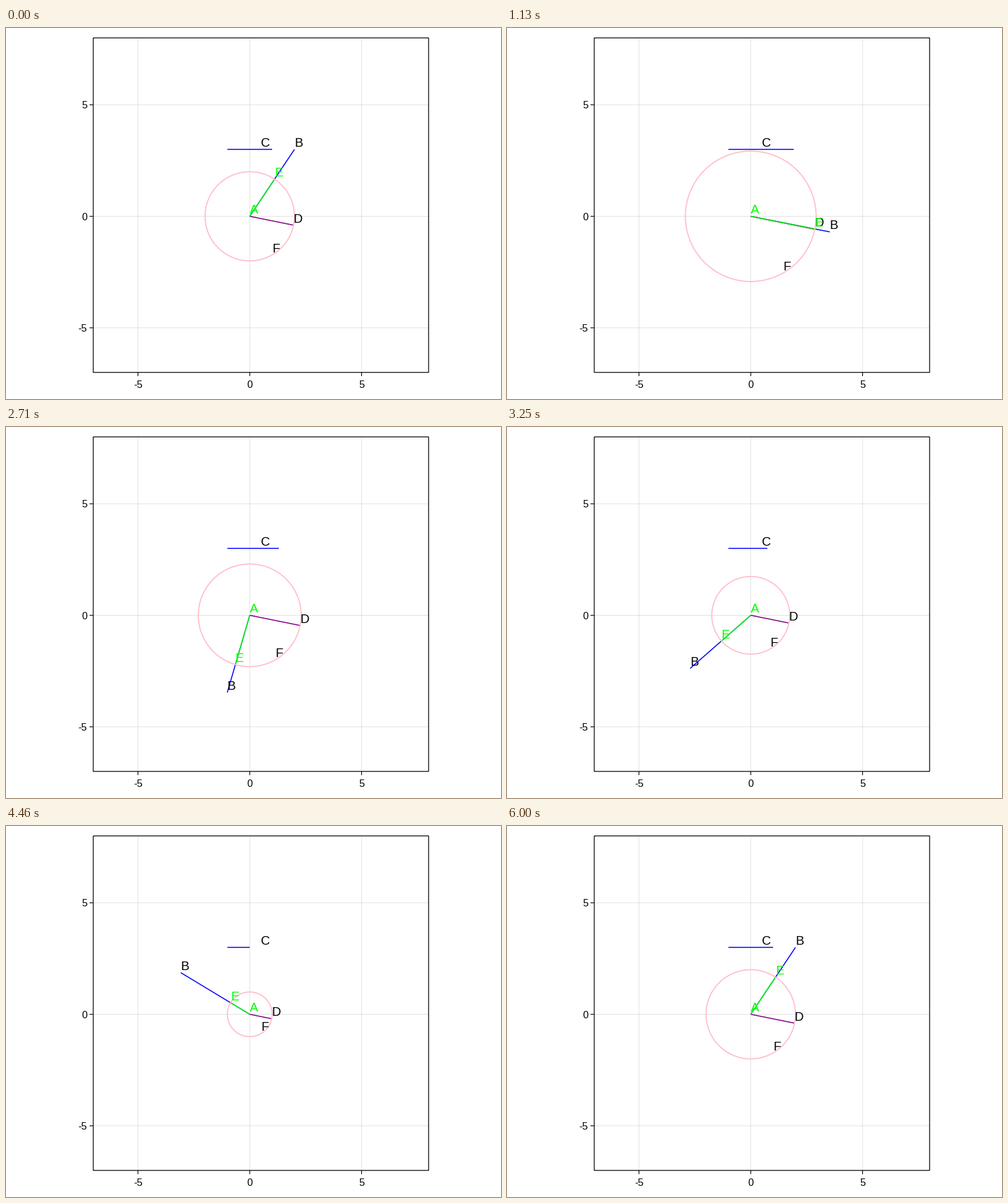
A matplotlib script for the animation above (6.04 s loop, 800 by 600 pixels).

```python
import numpy as np
import matplotlib.pyplot as plt
from matplotlib.animation import FuncAnimation

W, H, DPI = 800, 600, 100
LOOP, TICK = 6040, 20          # ms
FPS, STEPS = 24, 144           # pose rate and poses per turn
LEFT, RIGHT, TOP, BOTTOM = 141, 683, 16, 557
START = np.arctan2(3, 2)
ARM = np.hypot(2, 3)

plt.rcParams["font.family"] = "Liberation Sans"


def pt(px):
    return px * 72 / DPI


def to_px(x, y):
    """Data coordinates to stage pixels."""
    return (LEFT + (x + 7) * (RIGHT - LEFT) / 15,
            TOP + (8 - y) * (BOTTOM - TOP) / 15)


def polar(r, a):
    return r * np.cos(a), r * np.sin(a)


fig = plt.figure(figsize=(W / DPI, H / DPI), dpi=DPI, facecolor="white")
ax = fig.add_axes([0, 0, 1, 1])
ax.set_xlim(0, W)
ax.set_ylim(H, 0)
ax.axis("off")


def line(xs=(), ys=(), color="black", width=1.0, z=2, **kw):
    return ax.plot(xs, ys, color=color, lw=pt(width), zorder=z, snap=False,
                   solid_capstyle="butt", **kw)[0]


def label(s, x, y, size=20.4, color="black", ha="left"):
    return ax.text(x, y, s, fontsize=pt(size), color=color, ha=ha,
                   va="baseline", zorder=5)


# Grid, ticks and frame
for v in (-5, 0, 5):
    gx, gy = to_px(v, v)
    line([gx, gx], [TOP, BOTTOM], width=1, z=1, alpha=0.12)
    line([LEFT, RIGHT], [gy, gy], width=1, z=1, alpha=0.12)
    line([gx, gx], [BOTTOM, BOTTOM + 6], width=1.2)
    line([LEFT - 6, LEFT], [gy, gy], width=1.2)
    label(str(v), gx, 581.5, 16.2, ha="center")
    label(str(v), 131, gy + 6, 16.2, ha="right")
line([LEFT, RIGHT, RIGHT, LEFT, LEFT], [TOP, TOP, BOTTOM, BOTTOM, TOP],
     width=1.3, solid_joinstyle="miter")

# Moving parts
arm = line(color="blue", width=1.6, z=3)
ruler = line(color="blue", width=1.6, z=3)
spoke = line(color="purple", width=1.6, z=3)
inner = line(color="lime", width=1.6, z=3.5)
ring = line(color="pink", width=1.9, z=4)
names = {s: label(s, 0, 0, color="lime" if s in "AE" else "black")
         for s in "ABCDFE"}
ring_angles = np.linspace(0, 2 * np.pi, 181)


def put(s, x, y):
    px, py = to_px(x, y)
    names[s].set_position((px, py - 4.3))


def segment(artist, p, q):
    artist.set_data(*to_px(np.array([p[0], q[0]]), np.array([p[1], q[1]])))


def draw(k):
    t = k * TICK + TICK / 2
    step = min(int(t * FPS / 1000 + 0.1), STEPS)
    turn = 2 * np.pi * step / STEPS
    r = 2 + np.sin(turn)
    origin = (0, 0)
    b = polar(ARM, START - turn)
    e = polar(r, START - turn)
    d = polar(r, -0.2)

    segment(arm, origin, b)
    segment(inner, origin, e)
    segment(spoke, origin, d)
    segment(ruler, (-1, 3), (-1 + r, 3))
    ring.set_data(*to_px(*polar(r, ring_angles)))

    put("A", *origin)
    put("B", *b)
    put("C", 0.5, 3)
    put("D", *d)
    put("E", *e)
    put("F", *polar(r, -np.pi / 3))
    return [arm, inner, spoke, ruler, ring, *names.values()]


anim = FuncAnimation(fig, draw, frames=LOOP // TICK, interval=TICK,
                     init_func=lambda: draw(0), repeat=True, repeat_delay=0)
plt.show()
```
